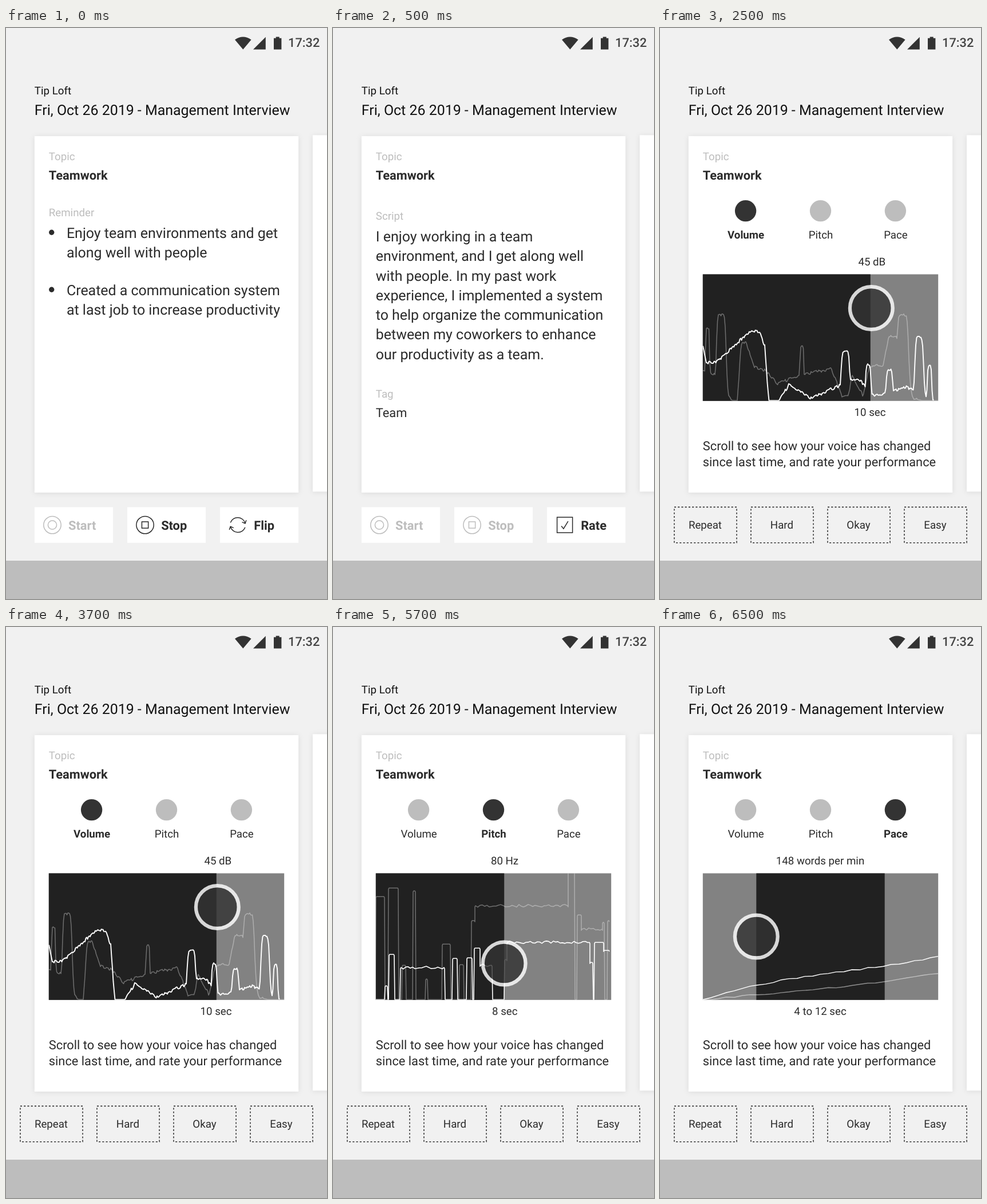
Recreate the animation shown at these times as an HTML page. Size 561x998 px, loop 8 s.

```html
<!DOCTYPE html>
<html lang="en">
<head>
<meta charset="utf-8">
<title>Interview practice</title>
<style>
  html, body { margin: 0; width: 100%; height: 100%; overflow: hidden; background: #f1f1f1; }
  svg { display: block; width: 100vw; height: 100vh; font-family: Roboto, sans-serif; text-rendering: geometricPrecision; }
  .shade { filter: drop-shadow(0 1px 5px rgba(0, 0, 0, .09)); }
</style>
</head>
<body>
<svg viewBox="0 0 561 998">
  <defs><clipPath id="plot"><rect x="74.8" y="430.5" width="411.4" height="221.3"/></clipPath></defs>
  <g id="base"></g>
  <g id="scene"></g>
</svg>
<script>
const INK = '#2b2b2b', PALE = '#bdbdbd', DARK = '#333';
const LOOP = 8000, STARTS = [0, 500, 2500, 4500, 6500];

// The layout is 360 units wide
const U = 561 / 360;
const SMALL = 12 * U, MEDIUM = 14 * U, LARGE = 16 * U;
const EDGE = 32 * U, LEFT = 48 * U, WIDTH = 264 * U, FLOOR = 651.2;

const text = (x, y, str, size = SMALL, fill = INK, extra = '') =>
  `<text x="${x}" y="${y}" font-size="${size}" fill="${fill}" ${extra}>${str}</text>`;
const centred = (x, y, str, bold) =>
  text(x, y, str, SMALL, INK, `text-anchor="middle" font-weight="${bold ? 700 : 400}"`);
const lines = (x, y, step, size, rows) =>
  rows.map((row, i) => text(x, y + i * step, row, size)).join('');
const rect = (x, y, w, h, fill, extra = '') =>
  `<rect x="${x}" y="${y}" width="${w}" height="${h}" fill="${fill}" ${extra}/>`;
const circle = (x, y, r, fill, extra = '') =>
  `<circle cx="${x}" cy="${y}" r="${r}" fill="${fill}" ${extra}/>`;

// Button icons, drawn around their own centre
const ICONS = {
  Start: circle(0, 0, 15.2, 'none') + circle(0, 0, 7.6, 'none'),
  Stop: circle(0, 0, 15.2, 'none') + rect(-5.6, -5.6, 11.2, 11.2, 'none'),
  Flip: [0, 180].map(a => `<path transform="rotate(${a})" fill="none"
    d="M-12.8 -4.2A13.5 13.5 0 0 1 12.8 -3.2M7.4 -5L12.9 -2.7L14.8 -8.4"/>`).join(''),
  Rate: rect(-13.5, -13.5, 27, 27, 'none') + '<path fill="none" d="M-6 2L-2.2 6.6L5.8 -6.4"/>'
};
const buttons = (...items) => items.map(([label, on], i) => {
  const x = EDGE + i * 104 * U, colour = on ? INK : PALE;
  return rect(x, 837.5, 88 * U, 62.3, '#fff') +
    `<g transform="translate(${x + 31.1} 868.6)" stroke="${colour}" stroke-width="1.5">${ICONS[label]}</g>` +
    text(x + 59.2, 876.5, label, MEDIUM, colour, 'font-weight="700"');
}).join('');

function random(seed) {
  return () => (seed = (seed * 16807) % 2147483647) / 2147483647 - .5;
}

// Points are [x, height above the plot floor]
const stroke = (points, opacity, width) =>
  `<polyline points="${points.map(([x, h]) => `${x.toFixed(1)},${(FLOOR - h).toFixed(1)}`).join(' ')}"
    fill="none" stroke="#fff" stroke-opacity="${opacity}" stroke-width="${width}" stroke-linejoin="round"/>`;

function between(keys, x) {
  const i = Math.max(1, keys.findIndex(k => k[0] >= x));
  const [x0, h0] = keys[i - 1], [x1, h1] = keys[i];
  return h0 + (h1 - h0) * (x - x0) / (x1 - x0);
}

// Voice level: a rough base line, overtopped by steep peaks [centre, half width, height]
function voice(keys, peaks) {
  const rnd = random(77), points = [];
  const end = keys[keys.length - 1][0];
  let jitter = 0;
  for (let x = keys[0][0], n = 0; x <= end; x += 1.5, n++) {
    if (n % 3 < 2) jitter = rnd() * 5;
    const base = between(keys, x);
    const tops = peaks.map(([c, w, h]) => h / (1 + Math.abs((x - c) / w) ** 7));
    const h = Math.max(base, ...tops);
    points.push([x, h > 2 ? h + jitter : h]);
  }
  return points;
}

// Pitch: blocks [from, to, height] on the floor; long ones get a rippled top
function blocks(list) {
  const rnd = random(5), points = [[LEFT, 0]];
  list.forEach(([from, to, h], i) => {
    const next = list[i + 1];
    if (!i || list[i - 1][1] < from) points.push([from - 1, 0]);
    points.push([from, h - 2], [from + 1, h]);
    if (to - from > 20) {
      for (let x = from + 5; x < to - 3; x += 4) points.push([x, h + rnd() * 5]);
    }
    points.push([to - 1, h], [to, h - 2]);
    if (next && next[0] > to) points.push([to + 1, 0]);
  });
  return points;
}

// Pace: a cubic rise over 30 slightly uneven steps
function rise(top, a, b, seed) {
  const rnd = random(seed), c = 1 - a - b;
  return Array.from({ length: 31 }, (_, i) => {
    const t = i / 30;
    return [LEFT + WIDTH * t, top * t * (a + b * t + c * t * t) + (i ? rnd() * 2.5 : 0)];
  });
}

const volume = () =>
  stroke(voice([[75, 55], [95, 45], [118, 0], [135, 0], [142, 100], [150, 102], [165, 60], [185, 52],
    [205, 30], [258, 48], [300, 55], [318, 8], [329, 8], [336, 45], [355, 8], [366, 60], [390, 62],
    [400, 112], [432, 110], [438, 5], [458, 0], [486, 0]],
    [[83, 4, 128], [107, 9, 150], [248, 4, 94], [424, 11, 150]]), .35, 1.5) +
  stroke(voice([[75, 98], [81, 67], [98, 66], [134, 100], [160, 123], [174, 121], [183, 95], [190, 0],
    [208, 0], [225, 27], [265, 4], [312, 26], [345, 40], [375, 8], [430, 24], [479, 0]],
    [[324, 8, 86], [364, 5, 62], [401, 6, 53], [453, 8, 110], [471, 4, 62]]), 1, 1.9);

const pitch = () =>
  stroke(blocks([[75, 90, 180], [97, 114, 195], [121, 127, 60], [140, 144, 190], [162, 165, 36],
    [191, 205, 97], [221, 228, 61], [242, 248, 138], [248, 411, 164], [411, 422, 230], [427, 434, 148],
    [434, 471, 123], [471, 474, 135], [480, 483, 138]]), .35, 1.5) +
  stroke(blocks([[91, 95, 24], [98, 107, 79], [118, 195, 56], [209, 217, 72], [234, 243, 73],
    [247, 257, 90], [257, 278, 60], [300, 304, 70], [304, 449, 100], [449, 454, 65], [457, 473, 100],
    [473, 483, 86]]), 1, 1.6);

const pace = () => stroke(rise(46, .83, -.2, 9), .5, 1.4) + stroke(rise(75, 1.82, -1.78, 31), 1, 1.4);

function review({ active, from, to, knob, value, valueX, span, spanX, graph }) {
  const tabs = ['Volume', 'Pitch', 'Pace'].map((name, i) => {
    const x = (96 + i * 84) * U;
    return circle(x, 319.6, 12 * U, i === active ? DARK : PALE) + centred(x + .5, 368, name, i === active);
  }).join('');
  const ratings = ['Repeat', 'Hard', 'Okay', 'Easy'].map((name, i) => {
    const x = (16 + i * 86) * U;
    return rect(x, 837.4, 70 * U, 62.3, 'none',
      `stroke="${DARK}" stroke-width="${U}" stroke-dasharray="${2 * U}"`) +
      centred(x + 54, 875, name);
  }).join('');
  const x = knob[0] * U, y = knob[1];
  return tabs + centred(valueX, 415, value) +
    rect(LEFT, 430.5, WIDTH, 221.3, '#828282') +
    rect(from * U, 430.5, (to - from) * U, 221.3, '#212121') +
    `<g clip-path="url(#plot)">${graph()}</g>` +
    circle(x, y, 22 * U, DARK, 'fill-opacity=".8"') +
    circle(x, y, 24 * U, 'none', `stroke="#fff" stroke-opacity=".82" stroke-width="${4 * U}"`) +
    centred(spanX, 678.4, span) +
    lines(LEFT, 738, 18 * U, MEDIUM, ['Scroll to see how your voice has changed',
      'since last time, and rate your performance']) + ratings;
}

const BODY = 22 * U;
const scenes = [
  text(LEFT, 329, 'Reminder', SMALL, PALE) +
    circle(79.7, 357.2, 3 * U, INK) + circle(79.7, 457.2, 3 * U, INK) +
    lines(68 * U, 367, BODY, LARGE, ['Enjoy team environments and get', 'along well with people']) +
    lines(68 * U, 466.7, BODY, LARGE, ['Created a communication system', 'at last job to increase productivity']) +
    buttons(['Start', false], ['Stop', true], ['Flip', true]),

  text(LEFT, 335.3, 'Script', SMALL, PALE) +
    lines(LEFT, 373, BODY, LARGE, ['I enjoy working in a team', 'environment, and I get along well',
      'with people. In my past work', 'experience, I implemented a system',
      'to help organize the communication', 'between my coworkers to enhance',
      'our productivity as a team.']) +
    text(LEFT, 646, 'Tag', SMALL, PALE) + text(LEFT, 680, 'Team', MEDIUM) +
    buttons(['Start', false], ['Stop', false], ['Rate', true]),

  review({ active: 0, from: 48, to: 236, knob: [237, 489.5], value: '45 dB', valueX: 370.3,
    span: '10 sec', spanX: 367, graph: volume }),
  review({ active: 1, from: 48, to: 192, knob: [192, 588], value: '80 Hz', valueX: 300,
    span: '8 sec', spanX: 300.3, graph: pitch }),
  review({ active: 2, from: 108, to: 252, knob: [108, 541], value: '148 words per min', valueX: 280,
    span: '4 to 12 sec', spanX: 280, graph: pace })
];

document.getElementById('base').innerHTML =
  rect(0, 0, 561, 998, '#f1f1f1') +
  `<path fill="${DARK}" d="M400 20.4Q414.3 10.4 428.6 20.4L414.3 37.6Z
    M432 37.6H453.8V15.7ZM468 17.8H471.7V15.6H477.7V17.8H481.4V37.6H468Z"/>` +
  text(493, 33.2, '17:32', MEDIUM, '#444', 'font-weight="500"') +
  text(EDGE, 115.6, 'Tip Loft', SMALL, '#111') +
  text(EDGE, 152, 'Fri, Oct 26 2019 - Management Interview', LARGE, '#111') +
  rect(EDGE, 189, 296 * U, 623, '#fff', 'class="shade"') +
  rect(344 * U, 187.3, 296 * U, 623, '#fff', 'class="shade"') +
  text(LEFT, 231, 'Topic', SMALL, PALE) +
  text(LEFT, 265.4, 'Teamwork', MEDIUM, INK, 'font-weight="700"') +
  rect(0, 931, 561, 67, PALE);

const stage = document.getElementById('scene');
let shown = -1;
function draw(ms) {
  const t = ms % LOOP;
  const now = STARTS.filter(s => s <= t).length - 1;
  if (now !== shown) stage.innerHTML = scenes[shown = now];
}

const begin = performance.now();
function tick() {
  draw(performance.now() - begin);
  requestAnimationFrame(tick);
}
tick();
</script>
</body>
</html>
```
